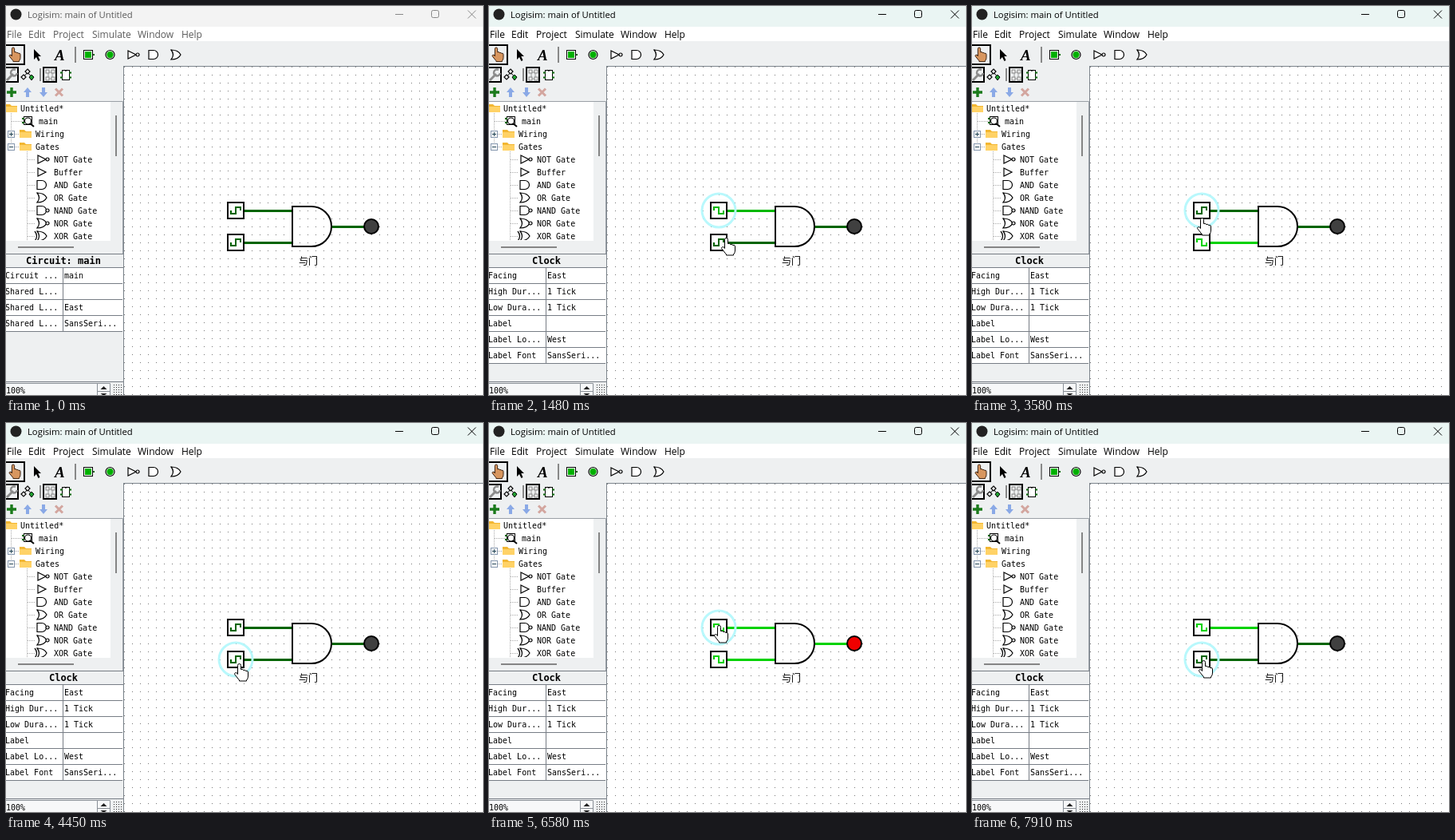
Animation of 598x487 px, one loop 8 s. Source, as an HTML page:

```html
<!DOCTYPE html>
<html lang="en">
<head>
<meta charset="utf-8">
<title>Logic circuit</title>
<style>
  html, body { margin: 0; width: 100%; height: 100%; overflow: hidden; background: #fff; }
  svg { display: block; }
  text { white-space: pre; }
  .ui { font: 12px "Open Sans", "Noto Sans", sans-serif; }
  .mono { font: 10px "DejaVu Sans Mono", monospace; }
  .head { font: bold 12px "DejaVu Sans Mono", monospace; text-anchor: middle; }
  .ink { fill: #fff; stroke: #000; stroke-width: 1.2; }
  .crisp { shape-rendering: crispEdges; }
</style>
</head>
<body>
<svg id="stage" width="598" height="487" viewBox="0 0 598 487"></svg>
<script>
const stage = document.getElementById('stage');
const LOW = '#006400', HIGH = '#00d200';
const HAND = 'M-2 13V2a2 2 0 0 1 4 0v5q3-1 3 1 3-1 3 1 3-1 3 1.5v5q0 3-2 5v1h-9v-1L-6 13q0-3 4-1z';

const rect = (x, y, w, h, fill, more = '') => `<rect x="${x}" y="${y}" width="${w}" height="${h}" fill="${fill}" ${more}/>`;
const path = (d, more = 'class="ink"') => `<path d="${d}" ${more}/>`;
const line = (d, color, width = 1, more = '') => path(d, `fill="none" stroke="${color}" stroke-width="${width}" ${more}`);
const text = (x, y, s, cls = 'mono', more = '') => `<text x="${x}" y="${y}" class="${cls}" ${more}>${s}</text>`;
const at = (x, y, body, scale = 1) => `<g transform="translate(${x} ${y}) scale(${scale})">${body}</g>`;
const frame = (x, y, w, h) => rect(x, y, w, h, 'none', 'stroke="#000" stroke-width="2"');

// Gate symbols, centred on their row
const bubble = x => `<circle cx="${x}" cy="0" r="2" class="ink"/>`;
const buffer = path('M-5-5L5 0-5 5z');
const and = path('M-6-5.5H0A5.5 5.5 0 0 1 0 5.5H-6z');
const or = path('M-6-6Q3-6 6 0 3 6-6 6-1 0-6-6z');
const icons = {
  'NOT Gate': buffer + bubble(7),
  'Buffer': buffer,
  'AND Gate': and,
  'OR Gate': or,
  'NAND Gate': and + bubble(7),
  'NOR Gate': or + bubble(7),
  'XOR Gate': or + line('M-9-6Q-4 0-9 6', '#000', 1.2)
};

function titleBar() {
  return rect(0, 0, 598, 26, '#f3f3f3', 'id="bar"') + rect(0, 26, 598, 18, '#fff')
    + '<circle cx="12.5" cy="10.5" r="7" fill="#222"/>'
    + text(27, 15, 'Logisim: main of Untitled', 'ui', 'id="caption" style="font-size:11.3px"')
    + `<g id="controls" fill="none">${path('M488 10.5h10', '')}${path('M535.5 5.5h5q2 0 2 2v5q0 2-2 2h-5q-2 0-2-2v-5q0-2 2-2z', '')}${path('M579 5.5l10 10m0-10l-10 10', '')}</g>`
    + '<g id="menu">' + [['File', 1], ['Edit', 28], ['Project', 59], ['Simulate', 108], ['Window', 165], ['Help', 220]]
      .map(([s, x]) => text(x, 40, s, 'ui')).join('') + '</g>';
}

function toolbar() {
  return rect(0, 44, 598, 32, '#eef0f1') + rect(0, 76, 147, 411, '#eef0f1')
    + frame(-2, 49, 25, 24)
    + at(9, 52, path(HAND, 'fill="#d8965f" stroke="#3a2010" stroke-width="1.2"'), .82)
    + at(35, 54, path('M0 0V13L3 10 5.5 15 7.5 14 5.3 9H9z', 'fill="#000"'))
    + text(61, 68, 'A', '', 'style="font:italic bold 19px Liberation Serif,serif"')
    + rect(86, 51, 2, 20, '#888')
    + rect(97.5, 55.5, 11, 11, '#fff', 'stroke="#000"') + rect(99, 57, 8, 8, '#00b000')
    + line('M109 61h2', LOW, 2)
    + '<circle cx="130.5" cy="61" r="5.5" class="ink"/><circle cx="130.5" cy="61" r="4.2" fill="#00b000"/>'
    + at(158, 61, icons['NOT Gate']) + at(185, 61, and) + at(213, 61, or)
    // explorer buttons
    + frame(-2, 77, 17, 18)
    + line('M1 93L9 85', '#8b8b8b', 3) + line('M12 80A4 4 0 1 0 14 84', '#8b8b8b', 2.4)
    + line('M27 83l-5 6m5-6l5 6', '#000') + path('M27 79l3 3-3 3-3-3zM22 86l3 3-3 3-3-3z')
    + path('M32 86l3 3-3 4-3-4z', 'fill="#20a030" stroke="#000"')
    + rect(42, 78, 2, 16, '#888') + frame(47, 77, 16, 18)
    + line('M52 83h6v8h-5m0-8v8', '#999')
    + [[50, 80], [57, 80], [50, 89], [57, 89]].map(([x, y]) => rect(x, y, 4, 4, '#eee', 'stroke="#888"')).join('')
    + rect(70.5, 80.5, 9, 12, '#fff', 'stroke="#000"')
    + line('M68 83.5h3m-3 6h3m8-6h3m-3 6h3', LOW, 2) + line('M73 80q2 3 4 0', '#000')
    + line('M1 108h12m-6-6v12', '#1b7a1b', 3.4)
    + path('M27 102l5 6h-3v6h-4v-6h-3z', 'fill="#8aa9e6"') + path('M47 114l5-6h-3v-6h-4v6h-3z', 'fill="#8aa9e6"')
    + line('M62 103.5l9 9m0-9l-9 9', '#d3a69f', 3);
}

function tree() {
  const folder = (x, y) => at(x, y, path('M0-5h6l2 2h7v8H0z', 'fill="#f2b632"') + rect(0, -2, 15, 7, '#ffd266'));
  const knob = (y, open) => rect(2.5, y - 4, 8, 8, '#fff', 'stroke="#8496ad"')
    + line(`M4 ${y}h5` + (open ? '' : `M6.5 ${y - 2.5}v5`), '#245');
  const gates = Object.keys(icons).map((name, i) => {
    const y = 192 + i * 16;
    return line(`M27 ${y + .5}h9`, '#aaa', 1, 'stroke-dasharray="1 1"') + at(45, y, icons[name]) + text(60, y + 4, name);
  }).join('');
  return rect(0, 120, 131, 174, '#fff') + line('M0 119.5H146.5V310', '#9aa0a6')
    + '<clipPath id="view"><rect x="0" y="120" width="131" height="173"/></clipPath><g clip-path="url(#view)">'
    + line('M6.5 134V172M26.5 182V293M11 160.5h6m-6 16h6M7 144.5h13', '#aaa', 1, 'stroke-dasharray="1 1"')
    + folder(-1, 128) + text(18, 132, 'Untitled*')
    + rect(22.5, 138.5, 10, 10, '#fff', 'stroke="#000"') + line('M20 141h3m-3 5h3', LOW, 2)
    + '<circle cx="27.5" cy="144" r="4" class="ink"/>' + line('M30 147l5 4', '#000', 2)
    + text(41, 148, 'main')
    + knob(160.5) + folder(17, 160) + text(37, 164, 'Wiring')
    + knob(176.5, true) + folder(17, 176) + text(37, 180, 'Gates')
    + gates + '</g>'
    + rect(137, 137, 2, 51, '#858585') + rect(15, 301, 70, 2, '#858585');
}

function table(id, name, rows) {
  const end = 328 + rows.length * 20;
  return `<g id="${id}">` + text(72, 323, name, 'head') + rect(0, 328, 146, end - 328, '#fff')
    + line('M71.5 328V' + end + rows.map((_, i) => `M0 ${347.5 + i * 20}H146`).join(''), '#777d85', 1, 'class="crisp"')
    + rows.map(([k, v], i) => text(-1, 341 + i * 20, k) + text(73, 341 + i * 20, v)).join('') + '</g>';
}

function panel() {
  const shared = 'Shared L...';
  return line('M0 310.5H147M0 327.5H147', '#777d85', 1, 'class="crisp"') + rect(0, 311, 146, 16, '#eef0f1')
    + table('circuitTable', 'Circuit: main', [['Circuit ...', 'main'], [shared, ''], [shared, 'East'], [shared, 'SansSeri...']])
    + table('clockTable', 'Clock', [['Facing', 'East'], ['High Dur...', '1 Tick'], ['Low Dura...', '1 Tick'],
      ['Label', ''], ['Label Lo...', 'West'], ['Label Font', 'SansSeri...']])
    + line('M0 470.5H147', '#777d85') + rect(0, 473, 131, 14, '#f7f8f9') + line('M0 472.5H130.5V487M114.5 473V487', '#8a9097')
    + text(0, 485, '100%')
    + rect(115, 482, 15, 1, '#8a9097') + path('M118.5 480l4-4 4 4zM118.5 485l4 3 4-3z', 'fill="#222"')
    + rect(133, 474, 13, 13, 'url(#fine)');
}

function canvas() {
  const clock = (id, y) => line(`M298 ${y + .5}H359`, LOW, 3, `id="${id}Wire"`)
    + rect(278, y - 10, 20, 20, '#fff', 'stroke="#000" stroke-width="2"')
    + line('', LOW, 2, `id="${id}Wave"`);
  return rect(148, 76, 450, 411, '#fff') + rect(148, 76, 450, 411, 'url(#grid)')
    + clock('a', 256) + clock('b', 296)
    + line('M408 276.5H449', LOW, 3, 'id="outWire"')
    + line('M383 251H359V301H383A25 25 0 0 0 383 251', '#000', 2)
    + '<circle id="led" cx="458" cy="276" r="9" stroke="#000" stroke-width="2"/>'
    + text(367, 324, '与门', '', 'style="font:12px Noto Sans CJK SC,Noto Sans CJK,sans-serif"')
    + '<circle id="halo" cx="288" r="21" fill="none" stroke="#b8f8fc" stroke-width="3"/>'
    + path(HAND, 'id="hand" fill="#fff" stroke="#000"');
}

stage.innerHTML = `<defs>
  <pattern id="grid" width="10" height="10" patternUnits="userSpaceOnUse">${rect(8, 6, 1, 1, '#777')}</pattern>
  <pattern id="fine" width="3" height="3" patternUnits="userSpaceOnUse">${rect(0, 0, 1, 1, '#333')}</pattern>
</defs>` + canvas() + titleBar() + toolbar() + tree() + panel() + line('M598 75.5H147.5V487', '#7d858d', 1, 'class="crisp"');

// Pointer path: time, x, y of the fingertip
const route = [[70, 330, 487], [600, 289, 252], [1240, 289, 252], [1480, 297, 290], [1720, 285, 294],
  [2030, 285, 294], [2270, 288, 297], [2490, 288, 297], [2730, 288, 265], [3040, 288, 253],
  [3360, 288, 253], [4050, 287, 292], [4290, 287, 292], [4450, 292, 301], [4600, 298, 318],
  [4760, 299, 318], [5380, 285, 293], [5700, 285, 293], [5930, 288, 266], [6170, 288, 253],
  [6830, 288, 253], [7290, 293, 298], [7430, 293, 298], [7510, 290, 297], [8000, 290, 297]];
const toggles = { a: [1010, 3360, 6490], b: [1950, 4370, 5780, 7910] };
const presses = [770, 1870, 3200, 4290, 6330, 7830];

const get = id => document.getElementById(id);
const set = (id, attrs) => { for (const k in attrs) get(id).setAttribute(k, attrs[k]); };
const count = (times, t) => times.filter(s => s <= t).length;
const show = (id, on) => set(id, { visibility: on ? 'visible' : 'hidden' });

function draw(t) {
  const high = t < 1870 ? '#00b800' : HIGH;
  const color = on => on ? high : LOW;
  const on = id => count(toggles[id], t) % 2 === 1;
  for (const [id, y] of [['a', 256], ['b', 296]]) {
    const d = on(id) ? -4 : 4;
    set(id + 'Wire', { stroke: color(on(id)) });
    set(id + 'Wave', { stroke: color(on(id)), d: `M282 ${y}v${d}h6v${-2 * d}h6v${d}` });
  }
  const lit = on('a') && on('b');
  set('outWire', { stroke: color(lit) });
  set('led', { fill: lit ? '#f00000' : '#404040' });

  const pressed = count(presses, t), active = pressed > 0;
  show('halo', active);
  set('halo', { cy: pressed % 2 ? 256 : 296 });
  show('clockTable', active);
  show('circuitTable', !active);
  const grey = Math.round(90 * (1 - Math.min(1, Math.max(0, (t - 770) / 240))));
  const tone = `rgb(${grey},${grey},${grey})`;
  set('bar', { fill: active ? '#eaf5f3' : '#f3f3f3' });
  set('caption', { fill: tone });
  set('menu', { fill: active ? '#000' : '#5a5a5a' });
  set('controls', { stroke: active ? tone : '#888' });

  show('hand', t >= 70);
  const i = Math.max(1, route.findIndex(p => p[0] > t));
  const [t0, x0, y0] = route[i - 1], [t1, x1, y1] = route[i];
  const k = Math.max(0, (t - t0) / (t1 - t0));
  set('hand', { transform: `translate(${Math.round(x0 + (x1 - x0) * k) + .5} ${Math.round(y0 + (y1 - y0) * k) + .5})` });
}

const start = performance.now();
function tick() {
  draw((performance.now() - start) % 8000);
  requestAnimationFrame(tick);
}
draw(0);
tick();
</script>
</body>
</html>
```
